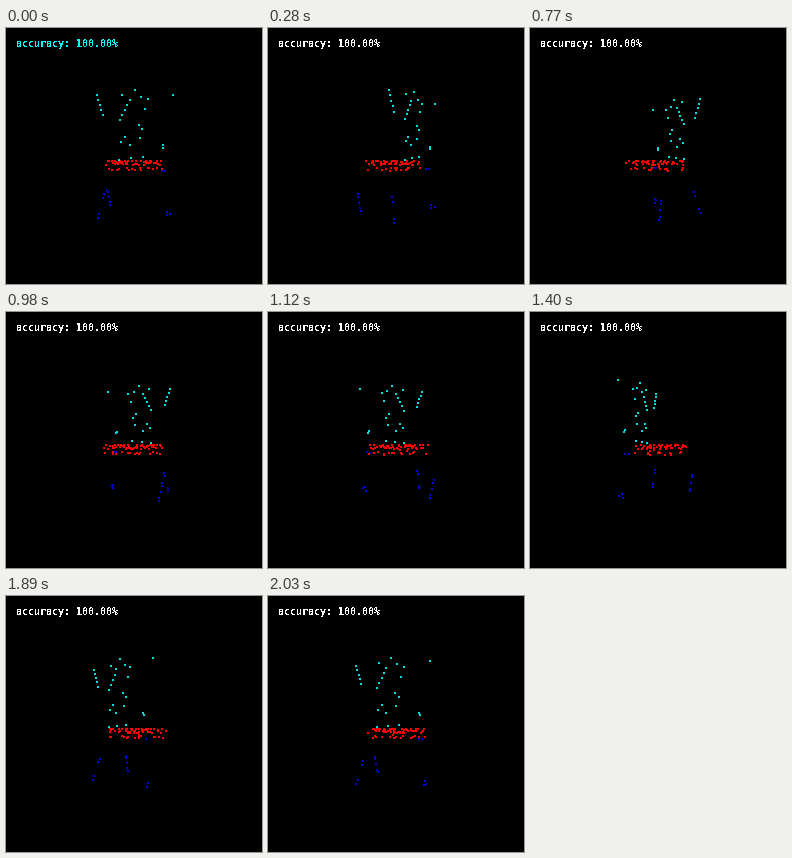
Animation, 256 px wide and 256 px high, one loop 2.1 s. Source, as a matplotlib script:

```python
import numpy as np
import matplotlib.pyplot as plt
from matplotlib.animation import FuncAnimation

SIZE, DPI = 256, 100
FRAMES, STEP = 30, 70
CENTER, DIST = 128.0, 225.0
CYAN, RED, BLUE = "#00e0e0", "#ff0000", "#0000d8"
BACK_Z = 22.5


def smooth(t):
    return t * t * (3 - 2 * t)


def stroke(n, *keys, ease=lambda t: t):
    """Place n points along the polyline through the (x, y, z) keys."""
    keys = np.array(keys, float)
    t = ease(np.linspace(0, 1, n)) * (len(keys) - 1)
    return np.column_stack([np.interp(t, range(len(keys)), k) for k in keys.T])


def rail(n, *keys):
    """A stroke lying in the upright plane of the back."""
    return stroke(n, *[(x, y, BACK_Z) for x, y in keys])


def make_back():
    return np.vstack([
        rail(5, (-33.8, -55), (-28.6, -37.6)),              # left post
        rail(1, (35, -55)),                                 # right post
        rail(2, (25.4, -10), (26, -8)),                     # right arm
        rail(2, (-11.7, -55.8), (0, -60)),                  # crest
        rail(5, (-4.5, -51.3), (-13.5, -33.3)),             # splat, left
        rail(3, (-9, -18), (-12.6, -13.5), (-4.5, -10.4)),
        rail(3, (5.4, -54), (11.8, -51.5), (9, -42.5)),     # splat, right
        rail(3, (3.6, -28.7), (7, -25), (4.5, -17)),
        rail(3, (-13.6, 2.7), (7.2, 0)),                    # lower rail
    ])


def make_legs():
    return np.vstack([
        stroke(4, (-28.1, 34.5, 20.7), (-31.8, 54.7, 26.4),
               ease=lambda t: smooth(smooth(t))),
        stroke(5, (-29.9, 36.6, -24), (-26.5, 53.3, -23), ease=smooth),
        stroke(3, (29.8, 49.7, 21.8), (31.2, 51.6, 24.6), (29, 53.4, 21.2)),
        stroke(2, (24.9, 12.9, 17.8), (27.2, 12.7, 21.1)),
    ])


def make_layer(rng, n, ys):
    """Spread n points in a golden-angle spiral over a rounded square."""
    k = np.arange(n)
    angle = k * np.pi * (3 - 5**0.5) + rng.normal(0, 0.25, n)
    c, s = np.cos(angle), np.sin(angle)
    r = np.sqrt((k + 0.5) / n) * (c**4 + s**4) ** -0.25
    return np.column_stack([29.5 * r * c, rng.choice(ys, n), -3 + 23.5 * r * s])


def make_seat():
    rng = np.random.default_rng(5)
    return np.vstack([make_layer(rng, 50, [4.6, 5.2, 6.8, 8]),
                      make_layer(rng, 15, [12, 12.8])])


def project(pts, turn):
    x, y, z = pts.T
    c, s = np.cos(turn), np.sin(turn)
    scale = DIST / (DIST - z * c + x * s)
    return CENTER + np.column_stack([x * c + z * s, y]) * scale[:, None]


fig = plt.figure(figsize=(SIZE / DPI, SIZE / DPI), dpi=DPI, facecolor="black")
ax = fig.add_axes([0, 0, 1, 1])
ax.set(xlim=(0, SIZE), ylim=(SIZE, 0))
ax.axis("off")

px = 72 / DPI
parts = [
    (pts, ax.scatter([], [], s=(1.3 * px) ** 2, marker="s", c=color, lw=0))
    for pts, color in ((make_legs(), BLUE), (make_seat(), RED),
                       (make_back(), CYAN))
]
label = ax.text(9.5, 19, "accuracy: 100.00%", family="DejaVu Sans Mono",
                weight="bold", size=10 * px, va="baseline", antialiased=False)


def update(i):
    turn = 2 * np.pi * i / FRAMES
    for pts, dots in parts:
        dots.set_offsets(project(pts, turn) + 0.5)
    label.set_color("#00ffff" if i == 0 else "white")
    return [dots for _, dots in parts] + [label]


anim = FuncAnimation(fig, update, frames=FRAMES, interval=STEP, repeat=True,
                     repeat_delay=0)
plt.show()
```
